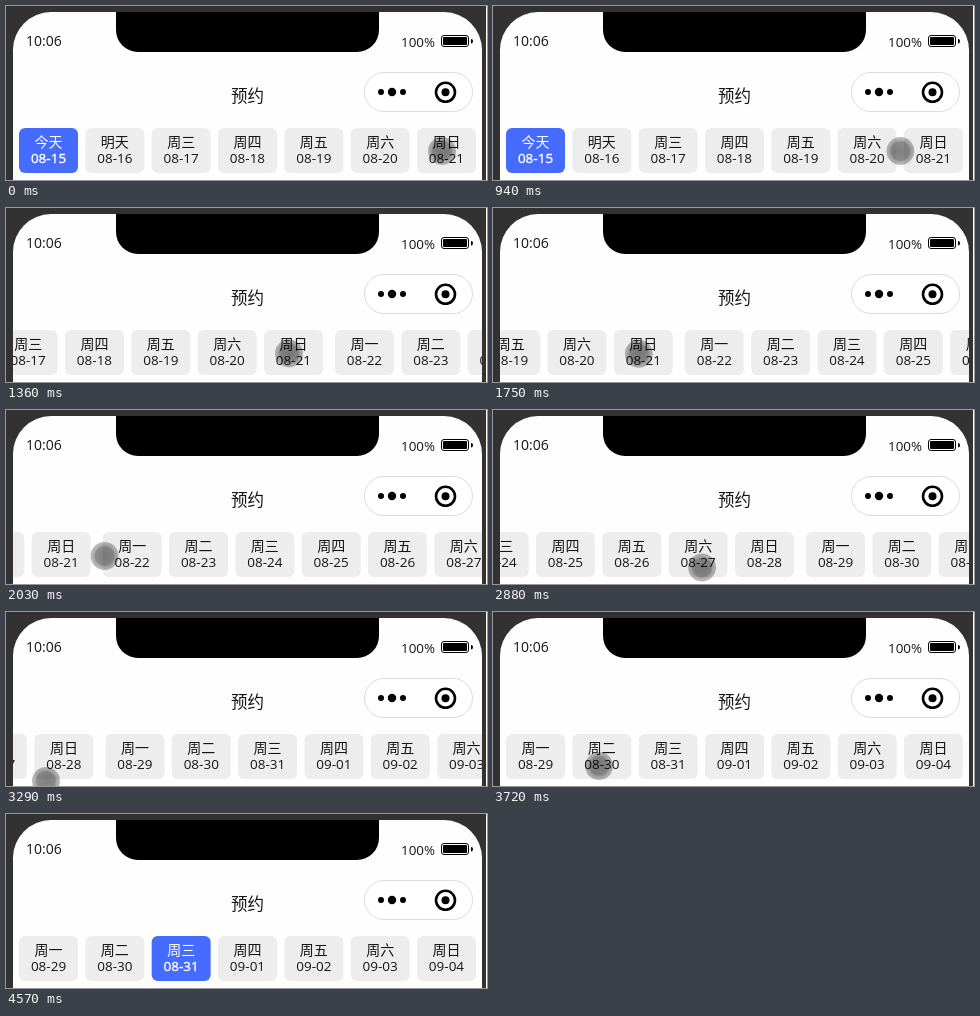
An HTML page for the animation above (5010 ms loop, 481 by 174 pixels).

```html
<!DOCTYPE html>
<html lang="zh-CN">
<head>
<meta charset="utf-8">
<title>预约</title>
<style>
  html, body { margin: 0; width: 481px; height: 174px; overflow: hidden; background: #323232; }
  svg { display: block; }
  text { font-family: "Open Sans", "Noto Sans", "Noto Sans CJK SC", "Noto Sans CJK", sans-serif; fill: #151515; }
  .mid { text-anchor: middle; }
  .day, .title { font-family: "Noto Sans CJK SC", "Noto Sans CJK", sans-serif; font-weight: 300; }
  .day { font-size: 14px; }
  .date { font-size: 13.5px; }
  .card rect { fill: #ededed; }
  .card.on rect { fill: #456bff; }
  .card.on text { fill: #fff; }
  .card.on .date { stroke: #fff; stroke-width: .4px; }
</style>
</head>
<body>
<svg width="481" height="174" viewBox="0 0 481 174">
  <defs>
    <clipPath id="view"><rect x="7" y="110" width="469" height="64"/></clipPath>
    <radialGradient id="touch">
      <stop offset="0" stop-opacity=".5"/>
      <stop offset=".65" stop-opacity=".45"/>
      <stop offset=".78" stop-opacity=".32"/>
      <stop offset="1" stop-opacity=".25"/>
    </radialGradient>
  </defs>

  <rect x="480" width="1" height="174" fill="#fefefe"/>
  <path d="M7 174V44A38 38 0 0 1 45 6H438A38 38 0 0 1 476 44V174Z" fill="#fefefe"/>
  <path d="M110 6H373V24A22 22 0 0 1 351 46H132A22 22 0 0 1 110 24Z"/>

  <text x="20" y="40" font-size="14">10:06</text>
  <text x="395" y="41" font-size="13.4">100%</text>
  <rect x="435.5" y="29.5" width="27" height="11" rx="2.5" fill="none" stroke="#000"/>
  <rect x="437" y="31" width="24" height="8" rx="1"/>
  <path d="M465 33Q467 33 467 35Q467 37.5 465 37.5Z"/>

  <text class="mid title" x="241.5" y="96" font-size="16.5">预约</text>

  <rect x="358.5" y="66.5" width="108" height="39" rx="19.5" fill="#fff" stroke="#dcdcdc"/>
  <circle cx="375" cy="86" r="3"/>
  <circle cx="386" cy="86" r="4.2"/>
  <circle cx="397" cy="86" r="3"/>
  <circle cx="439.5" cy="86.3" r="9.5" fill="none" stroke="#000" stroke-width="2.6"/>
  <circle cx="439.5" cy="86.3" r="4"/>

  <g clip-path="url(#view)"><g id="strip"></g></g>
  <circle id="cursor" r="14" fill="url(#touch)"/>
</svg>
<script>
const LOOP = 5010, TICK = 140;
const PAGE = 469, PITCH = 66.33, CARD = 59;
const SLOP = 32, SNAP = 560;
const strip = document.getElementById('strip');
const cursor = document.getElementById('cursor');

// Pointer key points, eased from one to the next
const path = [
  { t: 630, x: 436, y: 145 },
  { t: 2128, x: 95, y: 146 },
  { t: 2450, x: 378, y: 146 },
  { t: 3290, x: 40, y: 169 },
  { t: 3710, x: 106, y: 154 },
  { t: 3850, x: 106, y: 154 },
  { t: 3990, x: 118, y: 154 },
  { t: 4130, x: 186, y: 154 },
  { t: 4270, x: 186, y: 154 },
  { t: 4410, x: 224, y: 170 }
];
const drags = [{ start: 630, release: 1890 }, { start: 2450, release: 3150 }];
const taps = [{ t: 0, card: 0 }, { t: 3990, card: 15 }, { t: 4410, card: 16 }];
const LEAVE = 4550;

const clamp = u => Math.min(1, Math.max(0, u));
const easeInOut = u => (1 - Math.cos(Math.PI * u)) / 2;
const easeOut = u => 1 - (1 - u) ** 2;
const mix = (a, b, u) => a + (b - a) * u;

function pointer(t) {
  const next = path.findIndex(p => p.t > t);
  if (next === 0) return path[0];
  if (next < 0) return path[path.length - 1];
  const a = path[next - 1], b = path[next];
  const u = easeInOut((t - a.t) / (b.t - a.t));
  return { x: mix(a.x, b.x, u), y: mix(a.y, b.y, u) };
}

// One swipe: the strip follows the pointer, then snaps to the next page
function swipe(t, { start, release }) {
  const pulled = pointer(start).x - pointer(Math.min(t, release)).x;
  if (t < start || pulled < SLOP) return 0;
  return mix(pulled, PAGE, easeOut(clamp((t - release) / SNAP)));
}

function add(parent, tag, attrs, text) {
  const el = document.createElementNS('http://www.w3.org/2000/svg', tag);
  for (const key in attrs) el.setAttribute(key, attrs[key]);
  if (text) el.textContent = text;
  return parent.appendChild(el);
}

function dayName(i) {
  return ['今天', '明天'][i] || '周' + '一二三四五六日'[i % 7];
}

function dayDate(i) {
  const d = new Date(2022, 7, 15 + i);
  const two = n => String(n).padStart(2, '0');
  return two(d.getMonth() + 1) + '-' + two(d.getDate());
}

const cards = Array.from({ length: 21 }, (_, i) => {
  const x = 13 + Math.floor(i / 7) * PAGE + (i % 7) * PITCH;
  const mid = x + CARD / 2;
  const card = add(strip, 'g', { class: 'card' });
  add(card, 'rect', { x, y: 122, width: CARD, height: 45, rx: 6 });
  add(card, 'text', { class: 'mid day', x: mid, y: 141 }, dayName(i));
  add(card, 'text', { class: 'mid date', x: mid, y: 157 }, dayDate(i));
  return card;
});

function draw(now) {
  // The picture is refreshed in even ticks, half a tick out of phase
  const t = Math.floor(now % LOOP / TICK - 0.5) * TICK + TICK / 2;
  const offset = drags.reduce((sum, drag) => sum + swipe(t, drag), 0);
  const { x, y } = pointer(t);
  const chosen = (taps.findLast(tap => tap.t <= t) || taps[0]).card;
  strip.setAttribute('transform', `translate(${-offset} 0)`);
  cursor.setAttribute('transform', `translate(${x} ${y})`);
  cursor.style.display = t < LEAVE ? '' : 'none';
  cards.forEach((card, i) => card.classList.toggle('on', i === chosen));
}

const begin = performance.now();
function frame() {
  draw(performance.now() - begin);
  requestAnimationFrame(frame);
}
frame();
</script>
</body>
</html>
```
